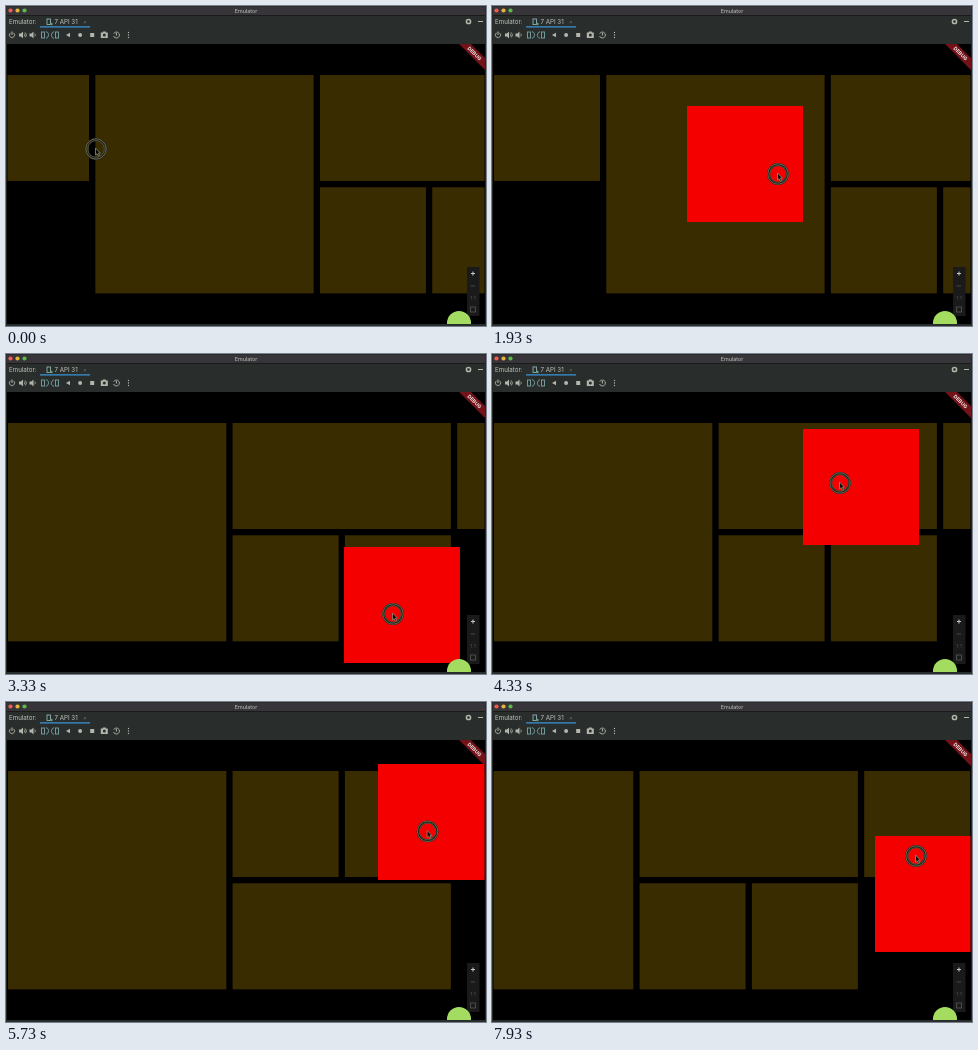
An HTML page with a canvas for the animation above (8000 ms loop, 480 by 320 pixels).

```html
<!DOCTYPE html>
<html lang="en">
<head>
<meta charset="utf-8">
<title>Emulator</title>
<style>
html, body { margin: 0; width: 100%; height: 100%; overflow: hidden; background: #000; }
canvas { display: block; width: 480px; height: 320px; }
</style>
</head>
<body>
<canvas id="stage" width="480" height="320"></canvas>
<script>
const ctx = document.getElementById('stage').getContext('2d');
const LOOP = 8000;
const BAR = '#292d2b', ICON = '#b4b6ac', FAINT = '#51534e', TEAL = '#7aa5a8';
const PITCH = 112.3, CELL = 106, LEFT = 2, TOP = 69;
const LIFT = 5, LIFTED = CELL + 2 * LIFT;

// Tile orders: S is 1x1, W is 2x1, B is 2x2 (columns x rows).
const SPANS = { S: [1, 1], W: [2, 1], B: [2, 2] };
const orders = [[0, 'SBWSS'], [2130, 'BWSSS'], [4430, 'BSWSS'], [5930, 'BWSSS']];

// The pointer lifts a cell, moves it to a point, rests, and drops it.
const drags = [
  { cell: [0, 0], grab: [91, 68], to: [286, 168], start: 800, reach: 1930, drop: 2500 },
  { cell: [3, 1], grab: [49, 67], to: [387, 260], start: 2950, reach: 3330, drop: 3530 },
  { cell: [3, 1], grab: [37, 54], to: [348, 129], start: 3800, reach: 4330, drop: 4600 },
  { cell: [3, 0], grab: [50, 67], to: [455, 128], start: 4830, reach: 6530, drop: 6950 },
  { cell: [4, 0], grab: [41, 20], to: [424, 154], start: 7400, reach: 7930, drop: LOOP }
];

const ramp = (t, a, b) => Math.min(1, Math.max(0, (t - a) / (b - a)));
const mix = (p, q, u) => p.map((v, i) => v + (q[i] - v) * u);
const scrollAt = t => 25 * (1 - ramp(t, 0, 450)) + 79 * ramp(t, 6070, 6827);
const cellAt = (col, row, t) => [LEFT + col * PITCH - scrollAt(t), TOP + row * PITCH];
const pickPoint = d => cellAt(...d.cell, d.start).map((v, i) => v - LIFT + d.grab[i]);

function pointerAt(t) {
  let previous = { to: [90, 143], drop: 0 };
  for (const d of drags) {
    if (t < d.start) return mix(previous.to, pickPoint(d), ramp(t, previous.drop, d.start));
    if (t < d.drop) return mix(pickPoint(d), d.to, ramp(t, d.start, d.reach));
    previous = d;
  }
  return previous.to;
}

// Each tile joins the shorter row; a two-row tile starts after both.
function pack(order) {
  const ends = [0, 0];
  return [...order].map(kind => {
    const [w, h] = SPANS[kind];
    const row = h === 2 || ends[0] <= ends[1] ? 0 : 1;
    const col = h === 2 ? Math.max(...ends) : ends[row];
    ends.fill(col + w, row, row + h);
    return { col, row, w, h };
  });
}

function rect(x, y, w, h, color) {
  ctx.fillStyle = color;
  ctx.fillRect(x, y, w, h);
}

function box(x, y, w, h, color) {
  ctx.strokeStyle = color;
  ctx.lineWidth = 0.9;
  ctx.strokeRect(x, y, w, h);
}

function disc(x, y, r, color) {
  ctx.fillStyle = color;
  ctx.beginPath();
  ctx.arc(x, y, r, 0, Math.PI * 2);
  ctx.fill();
}

function ring(x, y, r, color, width = 0.9, start = 0, end = Math.PI * 2) {
  ctx.strokeStyle = color;
  ctx.lineWidth = width;
  ctx.beginPath();
  ctx.arc(x, y, r, start, end);
  ctx.stroke();
}

function shape(path, x, y, fill, outline) {
  ctx.save();
  ctx.translate(x, y);
  const p = new Path2D(path);
  ctx.fillStyle = fill;
  ctx.fill(p);
  if (outline) {
    ctx.strokeStyle = outline;
    ctx.lineWidth = 0.8;
    ctx.stroke(p);
  }
  ctx.restore();
}

function label(text, x, y, size, color = '#c2c4bd', align = 'left', weight = '') {
  ctx.font = `${weight} ${size}px Inter, Roboto, sans-serif`;
  ctx.textAlign = align;
  ctx.fillStyle = color;
  ctx.fillText(text, x, y);
}

function clipped(x, y, w, h, paint) {
  ctx.save();
  ctx.beginPath();
  ctx.rect(x, y, w, h);
  ctx.clip();
  paint();
  ctx.restore();
}

function drawToolbar() {
  const y = 29, slot = i => 62 + 12.1 * i;
  ring(6, y, 2.6, ICON, 0.9, -1, 4.1);
  rect(5.5, y - 3.5, 1, 3.5, ICON);
  for (const [x, waves] of [[16, 2], [26.5, 1]]) {
    shape('M-3-1.5h2l2-2v7l-2-2h-2z', x, y, ICON);
    for (let i = 0; i < waves; i++) ring(x + 1, y, 1.8 + i * 1.5, ICON, 0.8, -0.9, 0.9);
  }
  for (const [x, side] of [[38, 1], [50, -1]]) {
    box(x - 1.5 - side, y - 3, 3, 6, TEAL);
    const middle = side > 0 ? 0 : Math.PI;
    ring(x + side, y, 3.5, TEAL, 0.9, middle - 1.3, middle + 1.3);
  }
  shape('M-2 0l4-2.2v4.4z', slot(0), y, ICON);
  disc(slot(1), y, 2, ICON);
  rect(slot(2) - 2, y - 2, 4, 4, ICON);
  shape('M-3.5-2.5h2v-1h3v1h2v5.5h-7z', slot(3), y, ICON);
  disc(slot(3), y, 1.5, BAR);
  ring(slot(4), y, 3, ICON, 0.9, -2.7, 2.8);
  rect(slot(4) - 0.5, y - 2, 1, 2.5, ICON);
  for (let i = -1; i <= 1; i++) disc(slot(5), y + 2.5 * i, 0.65, ICON);
}

function drawChrome() {
  rect(0, 0, 480, 38, BAR);
  rect(0, 0, 480, 9, '#37353a');
  rect(0, 9, 480, 1, '#191b19');
  box(0.5, 0.5, 479, 319, BAR);
  rect(0, 318, 480, 2, BAR);
  ['#f15b50', '#e3b43c', '#56bd48'].forEach((color, i) => disc(4.5 + 7 * i, 4.5, 2.1, color));
  label('Emulator', 240, 6.8, 5.4, '#c2c4bd', 'center');
  label('Emulator:', 3, 18, 6.2);
  rect(34, 20, 50, 1.7, '#3479a9');
  box(41, 13, 3.5, 5.5, '#8fb0b4');
  disc(45.5, 18, 1.2, '#55a96b');
  label('7 API 31', 48.5, 18, 6.2);
  label('×', 77, 18, 5.5, '#70726c');
  ring(462.5, 15.5, 2.1, ICON, 1.5);
  rect(472, 15, 5, 1, ICON);
  drawToolbar();
}

function drawBanner() {
  clipped(440, 38, 39, 40, () => {
    ctx.translate(468.5, 47.5);
    ctx.rotate(Math.PI / 4);
    rect(-24, -4.2, 48, 8.4, '#74121a');
    label('DEBUG', 0, 1.8, 5, '#f4ece8', 'center', 'bold');
  });
}

function drawControls() {
  rect(461, 261, 12.5, 49, '#191a19');
  label('+', 467, 270.3, 8, '#d0d2ca', 'center', 'bold');
  rect(464.5, 279.5, 4.5, 0.8, FAINT);
  label('1:1', 467, 294, 5, FAINT, 'center');
  box(464.5, 301, 5, 5, FAINT);
  clipped(436, 300, 36, 18, () => disc(453, 317, 12, '#a4dc62'));
}

function drawPointer(x, y) {
  ring(x, y, 9.4, '#22221c', 3);
  ring(x, y, 10.2, '#77775c', 0.8);
  ring(x, y, 8.3, '#66664e', 0.7);
  shape('M0-1v7l1.6-1.3 1.2 2.5 1.2-.6-1.1-2.4 1.9-.2z', x - 0.5, y, '#080808', '#8e8e7a');
}

function draw(t) {
  const [px, py] = pointerAt(t);
  const order = orders.filter(([from]) => from <= t).pop()[1];
  const drag = drags.find(d => t >= d.start && t < d.drop);
  const span = n => (n - 1) * PITCH + CELL;

  rect(0, 0, 480, 320, '#000');
  clipped(1.5, 38, 477, 280, () => {
    for (const { col, row, w, h } of pack(order)) {
      rect(...cellAt(col, row, t), span(w), span(h), '#3a2c01');
    }
    if (drag) {
      const x = Math.round(px - drag.grab[0]), y = Math.round(py - drag.grab[1]);
      rect(x, y, LIFTED, LIFTED, '#f40000');
    }
  });
  drawBanner();
  drawChrome();
  drawControls();
  drawPointer(px, py);
}

function frame() {
  draw(performance.now() % LOOP);
  requestAnimationFrame(frame);
}
frame();
</script>
</body>
</html>
```
